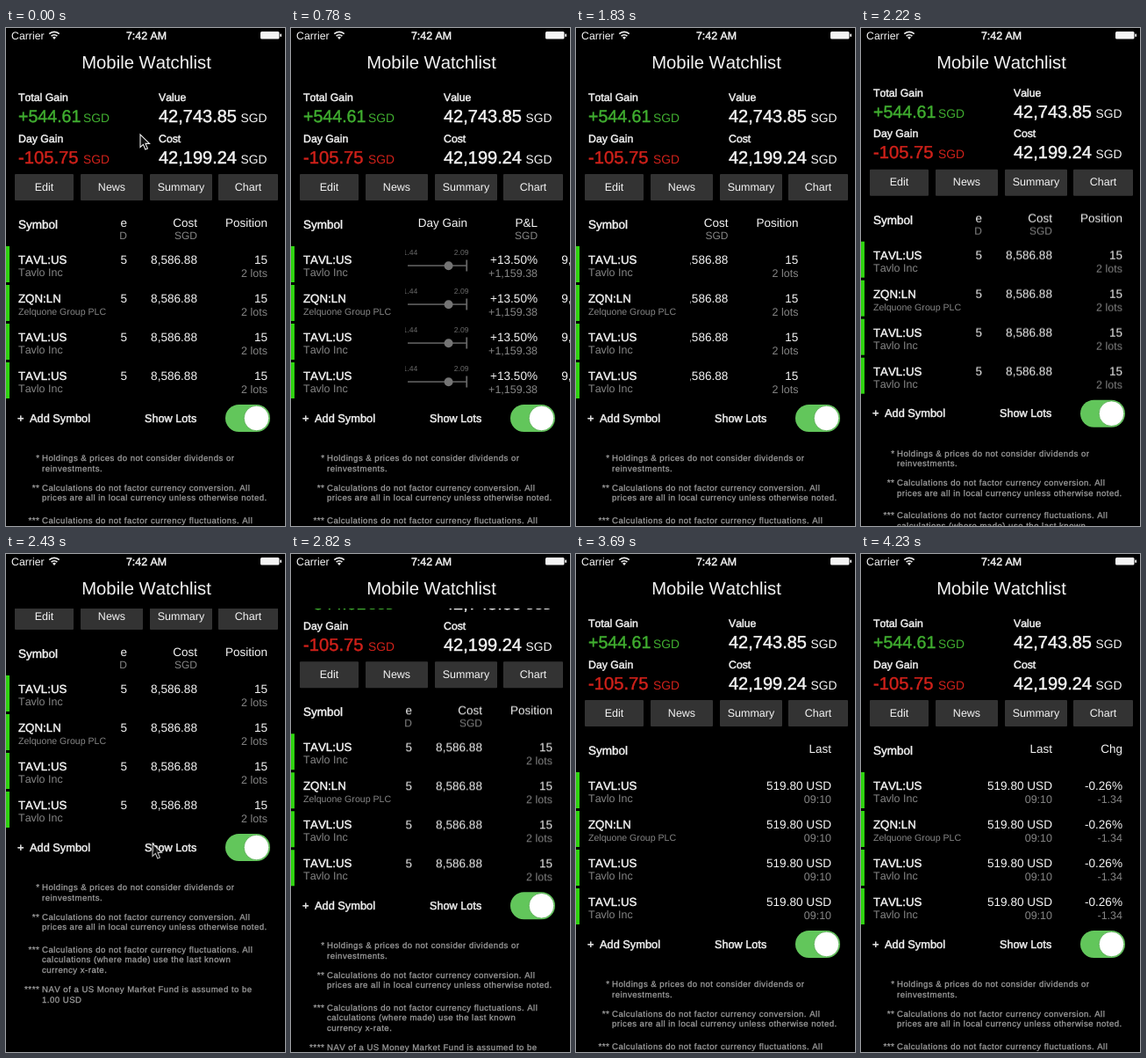
An HTML page that plays this animation: 318x566 px, repeating every 4260 ms.

```html
<!DOCTYPE html>
<html lang="en">
<head>
<meta charset="utf-8">
<title>Mobile Watchlist</title>
<style>
html, body { margin: 0; width: 100%; height: 100%; overflow: hidden; background: #000; }
svg { display: block; width: 318px; height: 566px; color: #f4f4f4; }
text {
  font-family: "Liberation Sans", Arial, sans-serif; font-kerning: none;
  text-rendering: geometricPrecision; fill: currentColor; white-space: pre;
}
.med { stroke: currentColor; stroke-width: .45; }
.dim { color: #858585; }
.scale { color: #6a6a6a; }
.gain { color: #40ae30; }
.loss { color: #d0211a; }
.note { color: #a0a0a0; letter-spacing: .48px; stroke: currentColor; stroke-width: .25; }
.end { text-anchor: end; }
.mid { text-anchor: middle; }
#page { animation: page 4260ms infinite; }
#cols { animation: cols 4260ms infinite; }
#pointer { animation: pointer 4260ms step-end infinite; }

@keyframes cols {
  0%, 12.91% { transform: translateX(-420px); animation-timing-function: cubic-bezier(.5, 0, .8, .7); }
  18.31% { transform: translateX(-199px); animation-timing-function: cubic-bezier(.2, .5, .4, 1); }
  23.94%, 29.58% { transform: translateX(0); animation-timing-function: cubic-bezier(.45, 0, .3, 1); }
  42.96% { transform: translateX(-465px); animation-timing-function: cubic-bezier(.2, .6, .2, 1); }
  50%, 78.87% { transform: translateX(-420px); animation-timing-function: cubic-bezier(.45, 0, .4, 1); }
  86.62% { transform: translateX(76px); animation-timing-function: cubic-bezier(.05, .8, .2, 1); }
  95.77%, 100% { transform: translateX(0); }
}
@keyframes page {
  0%, 51.41% { transform: translateY(0); animation-timing-function: cubic-bezier(.4, 0, .4, 1); }
  56.57%, 61.97% { transform: translateY(-110px); animation-timing-function: cubic-bezier(.4, 0, .4, 1); }
  72.54% { transform: translateY(36px); animation-timing-function: cubic-bezier(.2, .6, .2, 1); }
  77.46%, 100% { transform: translateY(0); }
}
@keyframes pointer {
  0% { transform: translate(153px, 121px); visibility: visible; }
  4.3% { transform: translate(167px, 329px); visibility: hidden; }
  55.7% { transform: translate(167px, 329px); visibility: visible; opacity: .8; }
  58.5%, 100% { transform: translate(167px, 329px); visibility: hidden; }
}
</style>
</head>
<body>
<svg viewBox="0 0 318 566">
  <defs><clipPath id="table"><rect x="130.7" y="200" width="188" height="230"/></clipPath></defs>
  <g id="page">
    <g id="body"></g>
    <g clip-path="url(#table)"><g id="cols"></g></g>
  </g>
  <rect width="318" height="62" fill="#000"/>
  <g id="top"></g>
  <g fill="none" stroke="#eee" stroke-width="1.7">
    <path d="M49.3 6.6a8.2 8.2 0 0 1 11.4 0M51.6 9.1a5 5 0 0 1 6.8 0"/>
    <path d="M55 13l-2-2.2a2.9 2.9 0 0 1 4 0z" fill="#eee" stroke="none"/>
  </g>
  <rect x="290" y="4" width="21.5" height="8.6" rx="1.5" fill="#f4f4f4"/>
  <rect x="312.3" y="6.6" width="1.7" height="3.4" rx=".8" fill="#f4f4f4"/>
  <path id="pointer" d="M0 0V14.5L3.4 11.4L5.8 17L8.4 15.9L6 10.4H10.6Z" fill="#111" stroke="#eee" stroke-width="1.1"/>
</svg>
<script>
const text = (s, x, y, size, cls = '') =>
  `<text x="${x}" y="${y}" font-size="${size}" class="${cls}">${s.replace(/&/g, '&amp;')}</text>`;
const box = (x, y, w, h, fill, r = 0) =>
  `<rect x="${x}" y="${y}" width="${w}" height="${h}" rx="${r}" fill="${fill}"/>`;
const fill = (id, parts) => document.getElementById(id).innerHTML = parts.join('');
const rowY = [0, 44, 88, 132];

fill('top', [
  text('Carrier', 6, 12.5, 12.3),
  text('7:42 AM', 160, 12.5, 12.4, 'mid med'),
  text('Mobile Watchlist', 160, 46, 20.3, 'mid')
]);

const total = (label, amount, x, y, size, unitX, cls) =>
  text(label, x, y, 12.3, 'med') +
  text(amount, x, y + 24, size, 'med ' + cls) +
  text('SGD', unitX, y + 24, 13.8, cls);

const buttons = [['Edit', 10, 67], ['News', 85, 71], ['Summary', 164, 71], ['Chart', 242, 68]];

const holdings = rowY.map((dy, i) => {
  const [code, name, size] = i === 1
    ? ['ZQN:LN', 'Zelquone Group PLC', 10.6]
    : ['TAVL:US', 'Tavlo Inc', 12.5];
  return box(0, 248 + dy, 4, 41, '#2fd310') +
    text(code, 14, 268 + dy, 13.3, 'med') +
    text(name, 14, 282 + dy, size, 'dim');
});

const notes = [
  ['*', 492, 'Holdings & prices do not consider dividends or', 'reinvestments.'],
  ['**', 525.5, 'Calculations do not factor currency conversion. All', 'prices are all in local currency unless otherwise noted.'],
  ['***', 562.5, 'Calculations do not factor currency fluctuations. All', 'calculations (where made) use the last known', 'currency x-rate.'],
  ['****', 608, 'NAV of a US Money Market Fund is assumed to be', '1.00 USD']
].map(([stars, y, ...lines]) =>
  text(stars, 38.5, y, 10, 'note end') +
  lines.map((s, i) => text(s, 41, y + i * 11.5, 9.6, 'note')).join(''));

fill('body', [
  total('Total Gain', '+544.61', 14, 83, 19.6, 88, 'gain'),
  total('Day Gain', '-105.75', 14, 129.5, 20.2, 88, 'loss'),
  total('Value', '42,743.85', 174, 83, 20, 267.5, ''),
  total('Cost', '42,199.24', 174, 129.5, 20, 267.5, ''),
  ...buttons.map(([s, x, w]) => box(x, 166, w, 30, '#333', 1) + text(s, x + w / 2, 184.7, 12.5, 'mid')),
  text('Symbol', 14, 228, 13.5, 'med'),
  ...holdings,
  text('+', 13, 447.5, 12.8, 'med'),
  text('Add Symbol', 27, 447.5, 12.8, 'med'),
  text('Show Lots', 158, 447.5, 12.7, 'med'),
  box(250, 428, 51, 31, '#62c65b', 15.5),
  '<circle cx="285.5" cy="443.5" r="14.3" fill="#fff" stroke="#4fa849" stroke-width=".8"/>',
  ...notes
]);

// right edge, heading, unit, value, detail
const columns = [
  [218, 'Last', '', '519.80 USD', '09:10'],
  [298, 'Chg', '', '-0.26%', '-1.34'],
  [398, 'Day Gain', '', '', ''],
  [478, 'P&L', 'SGD', '+13.50%', '+1,159.38'],
  [558, 'Value', 'SGD', '9,746.25', ''],
  [638, 'Cost', 'SGD', '8,586.88', ''],
  [718, 'Position', '', '15', '2 lots']
];
const slider = dy => `<g transform="translate(0 ${dy})">` +
  box(330, 269.2, 67, 1.8, '#555') + box(396.3, 263.5, 1.8, 13, '#666') +
  '<circle cx="376.5" cy="270.2" r="5" fill="#747474"/>' +
  text('1.44', 324.5, 258, 8.6, 'scale') + text('2.09', 399.5, 258, 8.6, 'scale end') + '</g>';

fill('cols', [
  ...columns.map(([x, head, unit, value, detail]) =>
    text(head, x, 226, 13.5, 'end') +
    text(unit, x, 240, 12, 'dim end') +
    rowY.map(dy =>
      text(value, x, 268 + dy, 13.6, 'end') +
      text(detail, x, 282.5 + dy, 12.5, 'dim end')).join('')),
  ...rowY.map(slider)
]);
</script>
</body>
</html>
```
